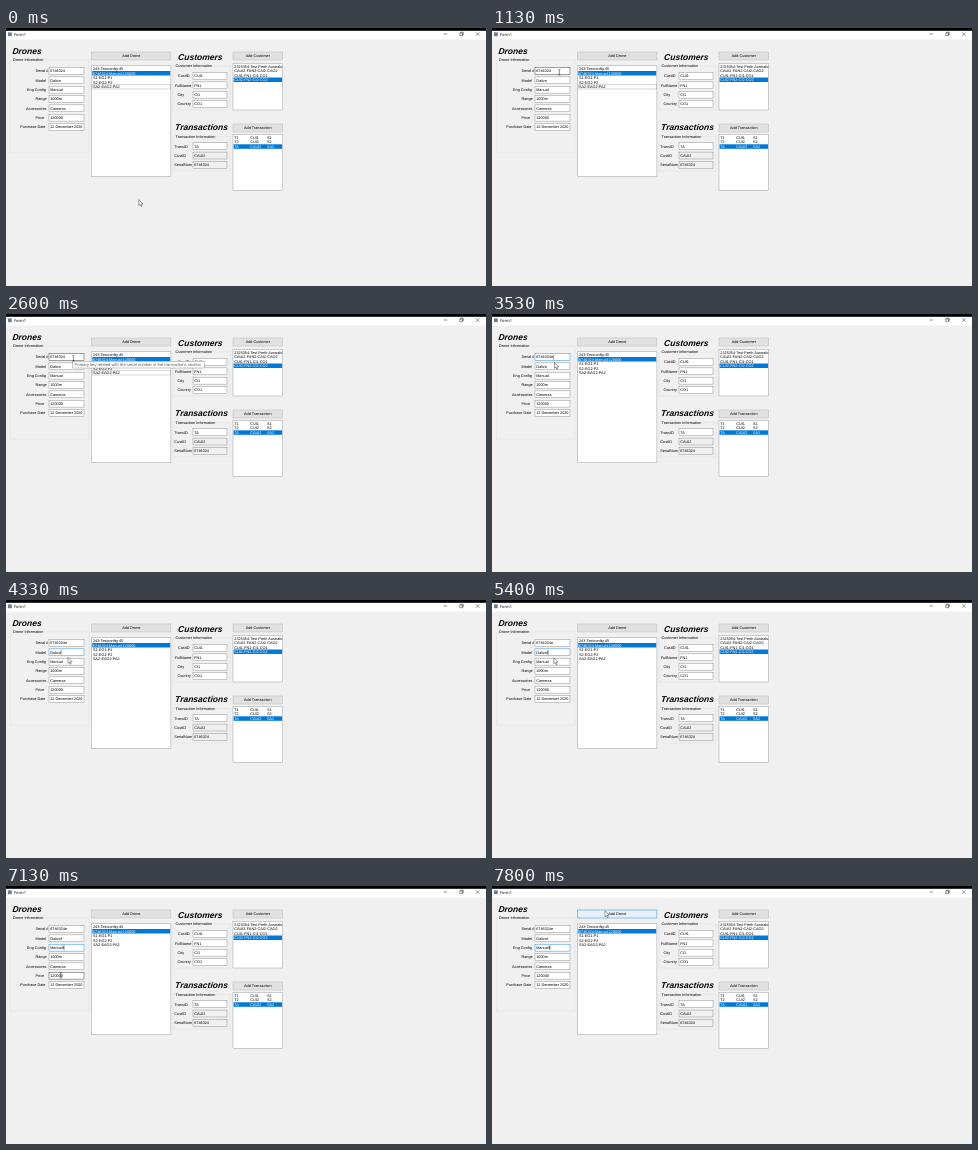
An HTML page for the animation above (8 s loop, 480 px wide and 258 px high).

```html
<!DOCTYPE html>
<html lang="en">
<head>
<meta charset="utf-8">
<title>Form1</title>
<style>
  html, body { margin: 0; width: 100%; height: 100%; overflow: hidden; background: #f0f0f0; }
  svg { display: block; width: 480px; height: 258px; }
  text { font: 3.8px "Liberation Sans", Arial, sans-serif; fill: #000; text-rendering: geometricPrecision; white-space: pre; }
  .title { font: 4px "Open Sans", sans-serif; }
  .head { font-size: 8.5px; font-weight: bold; font-style: italic; }
  .tip { font-size: 4.15px; fill: #575757; }
  .line { fill: none; stroke: #111; stroke-width: .45; }
</style>
</head>
<body>
<svg id="stage" viewBox="0 0 480 258"></svg>
<script>
const LOOP = 8000, PITCH = 4.5, BLUE = '#0078d7';
const stage = document.getElementById('stage');

function el(tag, attrs, parent = stage) {
  const node = document.createElementNS('http://www.w3.org/2000/svg', tag);
  for (const k in attrs) node.setAttribute(k, attrs[k]);
  return parent.appendChild(node);
}
const rect = (x, y, width, height, fill, stroke = 'none', parent) =>
  el('rect', { x, y, width, height, fill, stroke, 'stroke-width': .4 }, parent);
// y is the middle of the line of text
function text(x, y, str, attrs = {}, parent) {
  const node = el('text', { x, y: y + 1.4, ...attrs }, parent);
  node.textContent = str;
  return node;
}
const heading = (x, y, str) =>
  text(0, 0, str, { class: 'head', transform: `translate(${x} ${y}) skewX(-6)` });
function button(x, y, w, label) {
  const box = rect(x, y, w, 8, '#e1e1e1', '#adadad');
  text(x + w / 2, y + 4, label, { 'text-anchor': 'middle' });
  return { box, x, y, w, h: 8 };
}
function group(x, y, w, h, label) {
  rect(x, y, w, h, 'none', '#dcdcdc');
  const t = text(x + 2.5, y, label);
  t.before(rect(x + 2, y - 2, t.getComputedTextLength() + 1, 4, '#f0f0f0'));
}
function field(labelX, x, y, w, label, value, fill = '#fff') {
  const h = 6.9, top = y - h / 2;
  text(labelX, y, label);
  const box = rect(x, top, w, h, fill, '#7a7a7a');
  return { box, x, y: top, w, h, value, text: text(x + 1.2, y, value) };
}
function list(x, y, w, h, rows, selected, columns = [1.3]) {
  rect(x, y, w, h, '#fff', '#828790');
  const view = el('svg', { x, y, width: w - .4, height: h });
  rect(.6, .7 + selected * PITCH, w - 1.2, PITCH, BLUE, 'none', view);
  rows.forEach((row, i) => row.split('|').forEach((cell, c) =>
    text(columns[c], .7 + (i + .5) * PITCH, cell, i === selected ? { style: 'fill:#fff' } : {}, view)));
}

// window frame
rect(0, 0, 480, 258, '#f0f0f0');
rect(0, 0, 480, 11.5, '#fff');
rect(0, 0, 480, 2.8, '#000');
rect(2, 4.4, 3.8, 3.8, '#6b7f95');
text(8, 6.2, 'Form1', { class: 'title' });
el('path', { class: 'line', d: 'M437.5 6h3.6M453.8 5h2.7v2.7h-2.7zM454.6 5v-.8h2.7v2.7h-.8M470 4.3l3.5 3.5m0-3.5l-3.5 3.5' });

// drones
heading(6.3, 24.9, 'Drones');
group(4.5, 32, 78.5, 93, 'Drone Information');
const fields = [
  [29.5, 'Serial #', '6746324'], [29.5, 'Model', 'Dalivo'], [21, 'Eng Config', 'Manual'],
  [29.5, 'Range', '1000m'], [20, 'Accessories', 'Cameras'], [29.5, 'Price', '120000'],
  [14.3, 'Purchase Date', '12 December 2020']
].map(([x, label, value], i) => field(x, 43, 43 + i * 9.33, 35, label, value));
const addDrone = button(85.7, 24, 79.2, 'Add Drone');
list(85.7, 37.8, 79.2, 110.7,
  ['243-Testconfig-45', '6746324-Manual-120000', 'S1-EG1-P1', 'S2-EG2-P2', 'SA2-EAG2-PA2'], 1);
const listFocus = rect(86.3, 38.5 + 4 * PITCH, 78, PITCH, 'none', '#333');
listFocus.setAttribute('stroke-dasharray', '.4 .4');

// customers
heading(172, 30.9, 'Customers');
group(167, 38, 57, 44, 'Customer Information');
[[172, 'CustID', 'CUI1'], [169, 'FullName', 'FN1'], [171.5, 'City', 'CI1'], [171.5, 'Country', 'CO1']]
  .forEach(([x, label, value], i) => field(x, 187, 48 + i * 9.33, 34, label, value));
button(227, 24, 49.6, 'Add Customer');
list(227, 35.3, 49.6, 46.7,
  ['2325354-Test Perth Australia', 'CAUI2-FAN2-CAI2-CAO2', 'CUI1-FN1-CI1-CO1', 'CUI2-FN2-CI2-CO2'], 3);

// transactions
heading(169, 100.7, 'Transactions');
group(167, 108.6, 57, 34.4, 'Transaction Information');
[['TransID', 'TA', '#fff'], ['CustID', 'CAUI2', '#f0f0f0'], ['SerialNum', '6746324', '#f0f0f0']]
  .forEach(([label, value, fill], i) => field(168.3, 187, 118.2 + i * 9.33, 34, label, value, fill));
button(227, 96, 49.6, 'Add Transaction');
list(227, 106.6, 49.6, 55.6, ['T1|CUI1|S1', 'T2|CUI2|S2', 'TA|CAUI2|SA2'], 2, [1.3, 17.3, 34]);

// overlays
const caret = el('path', { class: 'line', d: 'M0 -2.5v5' });
const tip = el('g', {});
rect(66.8, 47.2, 131.4, 6.8, '#fff', '#767676', tip);
text(68.6, 50.6, 'Primary key related with the serial number in the transactions section', { class: 'tip' }, tip);
const arrow = el('path', { d: 'M0 0v5.9l1.35-1.3.95 2.2.95-.4-.95-2.1h1.9z', fill: '#fff', stroke: '#111', 'stroke-width': .4 });
const beam = el('path', { class: 'line', d: 'M-1-2.9q1 0 1 .7q0-.7 1-.7M0-2.3v4.6M-1 2.9q1 0 1-.7q0 .7 1 .7' });

// time, x, y of the pointer; it jumps from step to step
const path = [
  [0, 132.8, 171.7], [270, 112, 122], [330, 78, 79], [530, 68, 70], [730, 67.5, 51],
  [870, 67.4, 45.5], [1130, 67.4, 44.3], [3130, 62.5, 48.7], [3530, 62.5, 48.5],
  [3930, 63, 52], [4330, 62, 57.4], [5400, 61.8, 57.9], [5600, 62, 61], [6200, 62.3, 67],
  [6930, 58, 80], [7000, 55, 87], [7130, 54.8, 89.3], [7330, 98, 58], [7400, 110, 28],
  [7470, 113, 13], [7670, 114, 24.5], [7800, 113, 24.8]
];
// time and index of the focused field
const focus = [[0, -1], [2730, 0], [4130, 1], [5800, 2]];
// time, field, added letter
const typed = [[3130, 0, 'e'], [5200, 1, 'f'], [6400, 2, 'f']];

const at = (steps, t) => steps.findLast(s => s[0] <= t);
const inside = (b, x, y) => x >= b.x && x <= b.x + b.w && y >= b.y && y <= b.y + b.h;
const clamp = v => Math.max(0, Math.min(1, v));

function draw(t) {
  const [, x, y] = at(path, t);
  const active = at(focus, t)[1];
  let overField = false;

  fields.forEach((f, i) => {
    const over = inside(f, x, y);
    overField ||= over;
    f.box.setAttribute('stroke', i === active ? BLUE : over ? '#171717' : '#7a7a7a');
    f.text.textContent = f.value + typed.filter(k => k[1] === i && k[0] <= t).map(k => k[2]).join('');
  });

  caret.style.display = active < 0 ? 'none' : '';
  if (active >= 0) {
    const f = fields[active];
    caret.setAttribute('transform', `translate(${f.x + 1.5 + f.text.getComputedTextLength()} ${f.y + f.h / 2})`);
  }
  listFocus.style.display = active < 0 ? '' : 'none';

  const hover = inside(addDrone, x, y);
  addDrone.box.setAttribute('fill', hover ? '#e5f1fb' : '#e1e1e1');
  addDrone.box.setAttribute('stroke', hover ? BLUE : '#adadad');

  tip.style.opacity = Math.min(clamp((t - 2030) / 140), clamp((2870 - t) / 140));
  arrow.style.display = overField ? 'none' : '';
  beam.style.display = overField ? '' : 'none';
  (overField ? beam : arrow).setAttribute('transform', `translate(${x} ${y})`);
}

const start = performance.now();
function tick() {
  draw((performance.now() - start) % LOOP);
  requestAnimationFrame(tick);
}
tick();
</script>
</body>
</html>
```
